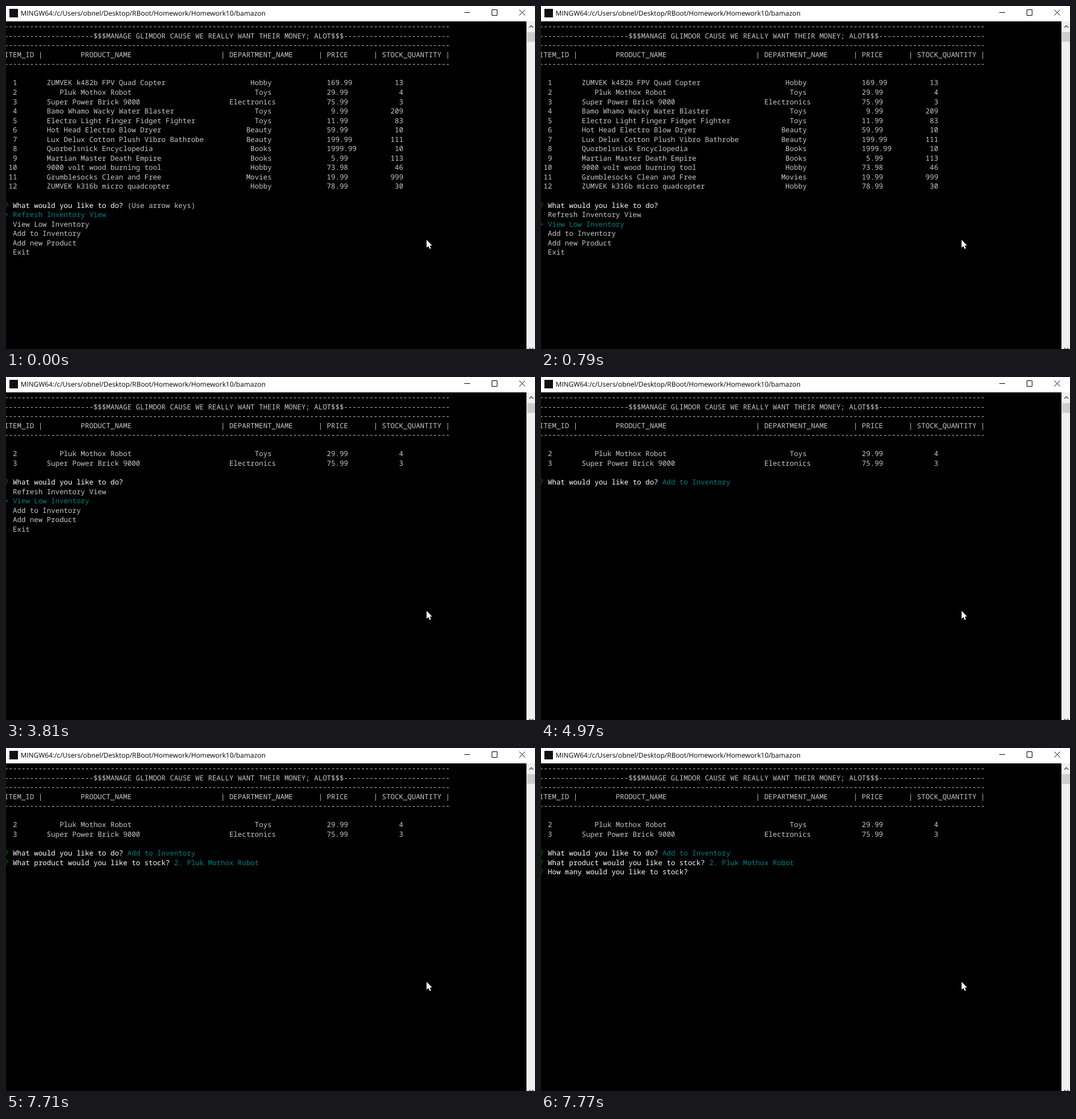
Write an HTML page that moves like this. It is 928x603 px and loops after 8000 ms.

```html
<!DOCTYPE html>
<html lang="en">
<head>
<meta charset="utf-8">
<title>Inventory manager</title>
<style>
  html, body { margin: 0; width: 100%; height: 100%; overflow: hidden; background: #000; }
  #stage { position: relative; width: 928px; height: 603px; overflow: hidden; background: #000; }
  svg { position: absolute; left: 0; top: 0; }
  svg text { font: 11.9px "Open Sans", sans-serif; text-rendering: geometricPrecision; }
  pre {
    position: absolute; left: -2.9px; top: 28.2px; margin: 0; color: #c8c8c8;
    font: 500 12.417px/16.55px "Noto Sans Mono", monospace;
    text-rendering: geometricPrecision; font-variant-ligatures: none;
  }
  .ask { color: #fff; }
  .mark { color: #008000; }
  .pick { color: #008080; }
</style>
</head>
<body>
<div id="stage">
  <pre id="screen"></pre>
  <svg width="928" height="603" fill="none">
    <path d="M0 0H928V27H0z" fill="#fff"/>
    <path d="M6 5h15v15H6z" fill="#111"/>
    <text x="25.5" y="16.5" fill="#000">MINGW64:/c/Users/obnel/Desktop/RBoot/Homework/Homework10/bamazon</text>
    <path d="M804 11.5h10M852.5 6.5h9v10h-9zM900.5 6.5l10 10M910.5 6.5l-10 10" stroke="#000"/>
    <path d="M913 27h15v576h-15z" fill="#f0f0f0"/>
    <path d="M914 46h14v17h-14z" fill="#cdcdcd"/>
    <path d="M918 38l3.5-3.5 3.5 3.5M918 601l3.5 3.5 3.5-3.5" stroke="#505050" stroke-width="1.5"/>
    <path d="M737.8 411v14l3.2-3 2.3 5 2.2-1-2.2-4.8h4.2z" fill="#fff"/>
  </svg>
</div>
<script>
const ROBOT = "Pluk Mothox Robot", BRICK = "Super Power Brick 9000";
const STOCK = [
  ["ZUMVEK k482b FPV Quad Copter", "Hobby", "169.99", 13],
  ["   " + ROBOT, "Toys", "29.99", 4],
  [BRICK, "Electronics", "75.99", 3],
  ["Bamo Whamo Wacky Water Blaster", "Toys", "9.99", 209],
  ["Electro Light Finger Fidget Fighter", "Toys", "11.99", 83],
  ["Hot Head Electro Blow Dryer", "Beauty", "59.99", 10],
  ["Lux Delux Cotton Plush Vibro Bathrobe", "Beauty", "199.99", 111],
  ["Quorbelsnick Encyclopedia", "Books", "1999.99", 10],
  ["Martian Master Death Empire", "Books", "5.99", 113],
  ["9000 volt wood burning tool", "Hobby", "73.98", 46],
  ["Grumblesocks Clean and Free", "Movies", "19.99", 999],
  ["ZUMVEK k316b micro quadcopter", "Hobby", "78.99", 30]
].map(([name, dept, price, count], i) => {
  const left = String(i + 1).padStart(3).padEnd(10) + name;
  const kind = dept.padStart(10);
  return (left.padEnd(53) + kind).padEnd(76) + price.padStart(5).padEnd(15) + String(count).padStart(3);
});
const LOW = STOCK.slice(1, 3);
const MENU = ["Refresh Inventory View", "View Low Inventory", "Add to Inventory", "Add new Product", "Exit"];
const PRODUCTS = ["2. " + ROBOT, "3. " + BRICK];
const HINT = "(Use arrow keys)";

// Places [column, text] pairs on one line.
const columns = cells => cells.reduce((line, [col, text]) => line.padEnd(col) + text, "");
const rule = "-".repeat(105);
const HEADER = [
  rule,
  "-".repeat(21) + "$$$MANAGE GLIMDOR CAUSE WE REALLY WANT THEIR MONEY; ALOT$$$" + "-".repeat(25),
  rule,
  columns([[0, "ITEM_ID |"], [18, "PRODUCT_NAME"], [51, "| DEPARTMENT_NAME"],
           [74, "| PRICE"], [87, "| STOCK_QUANTITY |"]]),
  rule, ""
];

const span = (cls, text) => `<span class="${cls}">${text}</span>`;
const ask = (question, tail = "") => `${span("mark", "?")} ${span("ask", question)} ${tail}`;
const list = (items, at) => items.map((s, i) => i === at ? span("pick", "&gt; " + s) : "  " + s);
const page = (rows, ...lines) => [...HEADER, ...rows, "", ...lines].join("\n");

const TODO = "What would you like to do?", WHICH = "What product would you like to stock?";
const menu = (rows, at, hint) => page(rows, ask(TODO, hint), ...list(MENU, at));
const chosen = ask(TODO, span("pick", MENU[2]));
const product = ask(WHICH, span("pick", PRODUCTS[0]));

const STEPS = [
  [0, menu(STOCK, 0, HINT)],
  [790, menu(STOCK, 1)],
  [1640, menu(LOW, 0, HINT)],
  [3810, menu(LOW, 1)],
  [4220, menu(LOW, 2)],
  [4970, page(LOW, chosen)],
  [5060, page(LOW, chosen, ask(WHICH, HINT), ...list(PRODUCTS, 0))],
  [7710, page(LOW, chosen, product)],
  [7770, page(LOW, chosen, product, ask("How many would you like to stock?"))]
];

const screenEl = document.getElementById("screen");
let shown, start;
function draw(now) {
  start ??= now;
  const t = (now - start) % 8000;
  const html = STEPS.findLast(([time]) => time <= t)[1];
  if (html !== shown) screenEl.innerHTML = shown = html;
  requestAnimationFrame(draw);
}
draw(performance.now());
</script>
</body>
</html>
```
